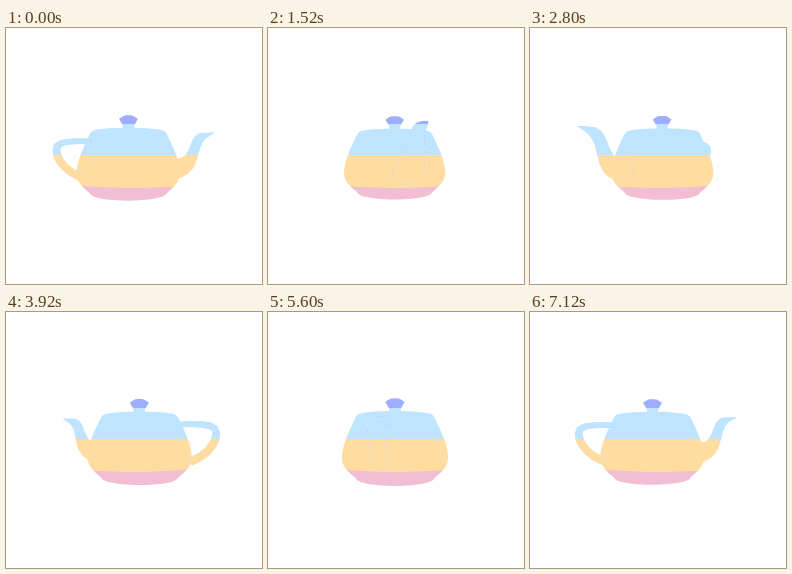
An HTML page with a canvas for the animation above (7200 ms loop, 256 px wide and 256 px high).

```html
<!DOCTYPE html>
<html lang="en">
<head>
<meta charset="utf-8">
<title>Turning teapot</title>
<style>
  html, body { margin: 0; width: 100%; height: 100%; overflow: hidden; background: #fff; }
  canvas { display: block; }
</style>
</head>
<body>
<canvas id="stage" width="256" height="256"></canvas>
<script>
const ctx = document.getElementById('stage').getContext('2d');
const STEP_MS = 80, STEPS = 90;
const SCALE = 25.3, DISTANCE = 228;
const CENTER_X = 128, CENTER_Y = 127.5;
const AXIS_X = 0.217, MID_HEIGHT = 1.575;
const KNOB = '#a0adfe', BLUE = '#bfe4ff', YELLOW = '#ffdca0', PINK = '#f1bed3';

const lerp = (a, b, t) => a + (b - a) * t;
const mixPoints = (p, q, t) => p.map((v, i) => lerp(v, q[i], t));
const smooth = t => t * t * (3 - 2 * t);

// Bezier curve of any degree through repeated interpolation.
const curve = (...points) => t => {
  let p = points;
  while (p.length > 1) p = p.slice(1).map((q, i) => mixPoints(p[i], q, t));
  return p[0];
};

const offset = (center, distance) => t => {
  const [x0, y0] = center(t - 0.001), [x1, y1] = center(t + 0.001);
  const k = distance(t) / Math.hypot(x1 - x0, y1 - y0);
  const [x, y] = center(t);
  return [x - (y1 - y0) * k, y + (x1 - x0) * k];
};

const sample = (n, f) => Array.from({ length: n + 1 }, (_, i) => f(i / n));

const lathe = outline => outline.map(([r, h]) => sample(40, v => {
  const a = v * Math.PI * 2;
  return [r * Math.cos(a), r * Math.sin(a), h];
}));

const tube = (inner, outer, width) => sample(10, t => sample(16, v => {
  const s = 1 - Math.abs(1 - 2 * v);
  const [x, h] = mixPoints(inner(t), outer(t), smooth(s));
  return [x, Math.sign(0.5 - v) * 3 * s * (1 - s) * width(t), h];
}));

// Profile as [radius, height]: faceted knob, lid, rim, wall, belly, foot.
const body = lathe([
  [0, 3.15], [0.2, 3.13], [0.37, 3.02], [0.23, 2.77], [0.2, 2.55],
  [1.3, 2.25], [1.36, 2.47], [1.4, 2.5], [1.45, 2.47],
  ...sample(8, t => [1.5 + 0.75 * t - 0.25 * t ** 3, 2.4 - 1.575 * t + 0.075 * t ** 3]),
  ...sample(8, t => [2 - 0.5 * smooth(t), 0.15 + 0.75 * (1 - t) ** 1.7]),
  ...sample(8, t => {
    const a = t * Math.PI / 2;
    return [1.5 * Math.abs(Math.cos(a)) ** 0.7, 0.15 - 0.15 * Math.sin(a) ** 0.7];
  })
]);

const upperArm = curve([-1.55, 2.14], [-2.4, 2.14], [-2.85, 2.14], [-2.85, 1.8]);
const lowerArm = curve([-2.85, 1.8], [-2.85, 1.46], [-2.58, 1.03], [-1.95, 0.75]);
const arm = t => t < 0.5 ? upperArm(t * 2) : lowerArm(t * 2 - 1);
const handle = [tube(
  offset(arm, t => 0.11 + 0.05 * t),
  offset(arm, t => -0.11 - 0.05 * t),
  () => 0.3
)];

const tipIn = [2.7, 2.4], tipOut = [3.3, 2.4];
const spout = [
  tube(
    curve([1.7, 1.425], [2.6, 1.425], [2.3, 2.1], tipIn),
    curve([1.7, 0.6], [3.1, 0.825], [2.4, 2.025], tipOut),
    t => lerp(0.66, 0.25, smooth(t))
  ),
  tube(curve(tipIn, [2.82, 2.46]), curve(tipOut, [3.43, 2.475]), t => 0.25 - 0.05 * t)
];

function projector(angle) {
  const c = Math.cos(angle), s = Math.sin(angle);
  return ([px, py, h]) => {
    const x = (px - AXIS_X) * SCALE, y = py * SCALE;
    const k = DISTANCE / (DISTANCE - x * s - y * c);
    return [
      CENTER_X + (x * c - y * s) * k,
      CENTER_Y - (h - MID_HEIGHT) * SCALE * k
    ];
  };
}

// Equal winding makes one nonzero fill the union of all triangles.
function addTriangle(path, a, b, c) {
  const area = (b[0] - a[0]) * (c[1] - a[1]) - (b[1] - a[1]) * (c[0] - a[0]);
  if (area < 0) [b, c] = [c, b];
  path.moveTo(...a);
  path.lineTo(...b);
  path.lineTo(...c);
  path.closePath();
}

function silhouette(meshes, project) {
  const path = new Path2D();
  for (const mesh of meshes) {
    const p = mesh.map(row => row.map(project));
    for (let i = 1; i < p.length; i++) {
      for (let j = 1; j < p[i].length; j++) {
        addTriangle(path, p[i - 1][j - 1], p[i - 1][j], p[i][j]);
        addTriangle(path, p[i - 1][j - 1], p[i][j], p[i][j - 1]);
      }
    }
  }
  return path;
}

// Colour bands stay fixed to the stage; the lowest has a slight bow.
function paintBands() {
  [[KNOB, 0], [BLUE, 96], [YELLOW, 127]].forEach(([color, top]) => {
    ctx.fillStyle = color;
    ctx.fillRect(0, top, 256, 256 - top);
  });
  ctx.fillStyle = PINK;
  ctx.beginPath();
  ctx.moveTo(68, 157);
  ctx.quadraticCurveTo(CENTER_X, 163.5, 188, 157);
  ctx.lineTo(188, 256);
  ctx.lineTo(68, 256);
  ctx.fill();
}

function draw(step) {
  const angle = step / STEPS * Math.PI * 2;
  const project = projector(angle);
  ctx.clearRect(0, 0, 256, 256);
  ctx.fill(silhouette([body, ...handle, ...spout], project));
  ctx.globalCompositeOperation = 'source-atop';
  paintBands();

  // A barely visible edge on the nearer limb.
  ctx.strokeStyle = 'rgba(255, 255, 255, 0.12)';
  ctx.save();
  const front = silhouette(Math.sin(angle) > 0 ? spout : handle, project);
  ctx.stroke(front);
  ctx.clip(front);
  paintBands();
  ctx.restore();
  ctx.globalCompositeOperation = 'source-over';
}

let shown = -1;
const start = performance.now();
function tick() {
  const step = Math.floor((performance.now() - start) / STEP_MS) % STEPS;
  if (step !== shown) draw(shown = step);
  requestAnimationFrame(tick);
}
tick();
</script>
</body>
</html>
```
